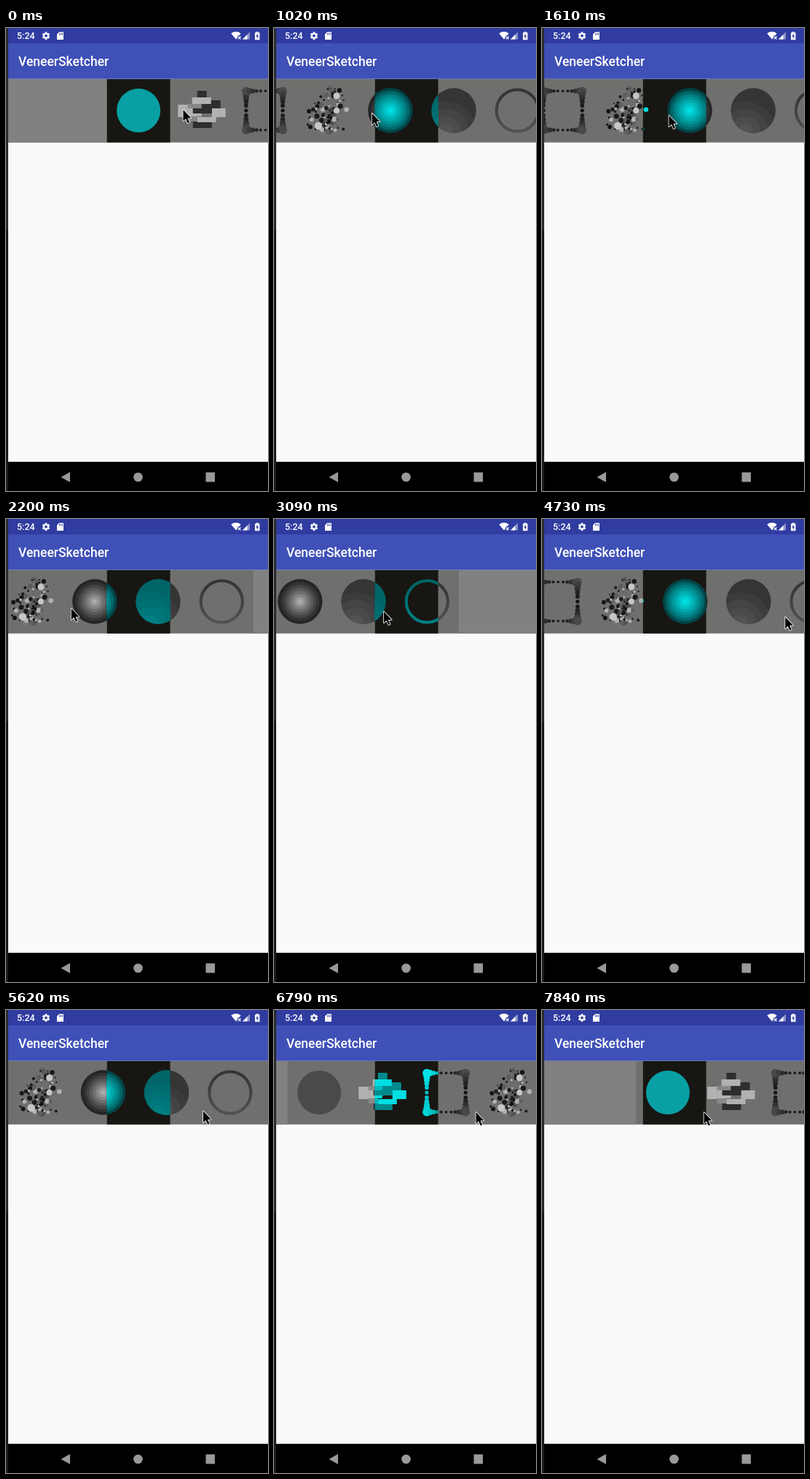
An HTML page with a canvas for the animation above (8000 ms loop, 360x634 px).

```html
<!DOCTYPE html>
<html lang="en">
<head>
<meta charset="utf-8">
<title>Gallery strip</title>
<style>
  html, body { margin: 0; width: 100%; height: 100%; overflow: hidden; background: #fafafa; }
  canvas { position: absolute; left: 0; top: 0; width: 360px; height: 634px; }
  span { position: absolute; color: #fff; font-family: Roboto, sans-serif; font-weight: 500; white-space: nowrap; }
  #clock { left: 15px; top: 3px; font-size: 12.5px; line-height: 16px; }
  #title { left: 17px; top: 34px; font-size: 17.5px; line-height: 24px; }
</style>
</head>
<body>
<canvas id="stage"></canvas>
<span id="clock">5:24</span>
<span id="title">VeneerSketcher</span>
<script>
const W = 360, H = 634, LOOP = 8000, STEP = 148, LAST = 53;
const TOP = 69.75, TILE = 87.25, CX = TILE / 2, MID = 113, LENS = 138.5;
const BAR = '#303ca0', TAU = Math.PI * 2;
const canvas = document.getElementById('stage');
const dpr = window.devicePixelRatio || 1;
canvas.width = W * dpr;
canvas.height = H * dpr;
const c = canvas.getContext('2d');

const clamp = u => Math.min(1, Math.max(0, u));
const mix = (a, b, u) => a + (b - a) * u;
const linear = u => u;
const smooth = u => u * u * (3 - 2 * u);
const fling = u => 1 - (1 - u) ** 1.6;

// Each gesture: last step, strip offset there, easing, sideways bulge on the way.
const gestures = [
  { end: 7, to: -232.8, ease: smooth },
  { end: 15, to: -270.8, ease: u => u ** 3, bulge: 48 },
  { end: 17, to: -385, ease: fling },
  { end: 19, to: -385, ease: linear },
  { end: 26, to: -242.7, ease: smooth },
  { end: 38, to: -259.2, ease: linear, bulge: 55 },
  { end: 46, to: 18.5, ease: smooth },
  { end: 53, to: 129.3, ease: fling }
];
function offset(k) {
  let from = LENS, begin = 0;
  for (const { end, to, ease, bulge = 0 } of gestures) {
    if (k <= end) {
      const u = (k - begin) / (end - begin);
      return mix(from, to, ease(u)) + bulge * Math.sin(Math.PI * u);
    }
    from = to;
    begin = end;
  }
  return from;
}

// The pointer holds the strip while dragging and travels freely between drags.
function pointer(k) {
  const y = mix(112, 140, clamp(k / 40));
  const x = k < 7 ? mix(243, 134, k / 7)
    : k < 16 ? offset(k) + mix(367, 360, (k - 7) / 8)
    : k < 19 ? 50
    : k < 22 ? mix(50, offset(22) + 529.7, (k - 19) / 3)
    : k < 39 ? offset(k) + 529.7
    : k < 46 ? mix(270, 277, (k - 38) / 8) + 55 * Math.sin(Math.PI * (k - 38) / 8)
    : mix(277, 222, (k - 46) / 7);
  return [x, y];
}

function rect(x, y, w, h, fill) {
  c.fillStyle = fill;
  c.fillRect(x, y, w, h);
}
function disc(x, y, r, fill) {
  c.fillStyle = fill;
  c.beginPath();
  c.arc(x, y, r, 0, TAU);
  c.fill();
}
// Outline from "x,y x,y" text.
function poly(pts, fill) {
  c.fillStyle = fill;
  c.beginPath();
  pts.split(' ').forEach(p => c.lineTo(...p.split(',').map(Number)));
  c.closePath();
  c.fill();
}
// v: 0 dark to 1 bright
function tone(v, lit) {
  const g = Math.round(lit ? mix(90, 228, v) : mix(20, 185, v));
  return lit ? `rgb(0,${g},${g + 3})` : `rgb(${g},${g},${g})`;
}
function shade(lit) {
  const g = c.createLinearGradient(0, MID - 20, 0, MID + 31);
  g.addColorStop(0, tone(lit ? .08 : .2, lit));
  g.addColorStop(1, tone(lit ? .3 : .38, lit));
  return g;
}

function seeded(seed) {
  return () => (seed = seed * 16807 % 2147483647) / 2147483647;
}

function emblem(lit) {
  disc(CX, MID, 30, lit ? '#08a0a4' : '#4a4a4a');
}

// Overlapping slabs, widest in the middle, light on the left and dark on the right.
function boxes(lit) {
  const light = tone(.96, lit), mid = tone(.7, lit), dark = tone(lit ? .35 : .16, lit);
  rect(37, 86, 13, 10, dark);
  rect(24, 104, 20, 14, mid);
  rect(43, 99, 26, 18, dark);
  rect(30, 95, 26, 9, light);
  rect(10.5, 105, 13.5, 17, light);
  rect(24, 110, 19, 11, light);
  rect(57, 110, 19, 12, light);
  rect(24, 121, 13, 7, mid);
  rect(31, 128, 26, 9, dark);
  rect(37, 122, 26, 7, light);
  rect(31, 110, 26, 7, dark);
}

// A square of beads: large at the corners, small halfway along each side.
function beads(lit) {
  const half = 26.7, n = 10;
  for (let side = 0; side < 4; side++) {
    for (let i = 0; i <= n; i++) {
      const a = 2 * i / n - 1, s = Math.sign(a) * Math.abs(a) ** .85 * half;
      const edge = side < 2 ? -half : half, flat = side % 2;
      const x = flat ? s : edge, y = flat ? edge : s;
      const r = flat ? 1.8 + 3.8 * Math.abs(a) ** 2 : 2.6 + 3 * Math.abs(a) ** 1.5;
      const glow = lit ? .65 - x / half * .35 - y / half * .1 - .25 * (1 - Math.abs(a))
        : .32 * Math.abs(a) ** 1.3;
      disc(CX + x, MID + y, r, tone(clamp(glow), lit));
    }
  }
}

const rnd = seeded(23);
const bubbles = Array.from({ length: 110 }, (_, i) => {
  const q = rnd(), big = i % 11 === 0;
  const reach = mix(12, 33, Math.sin(q * 2.5)), mid = mix(50, 40, q);
  const r = big ? 4 + 3 * rnd() : 1 + 2.6 * rnd() ** 1.5;
  const v = big ? .35 + .3 * rnd() : [0, 0, .04, .45, .95][Math.floor(rnd() * 5)];
  return { x: mid + (rnd() + rnd() - 1) * reach, y: mix(83, 143, q), r, v, big };
}).sort((a, b) => b.big - a.big);
function cluster(lit) {
  bubbles.forEach(b => disc(b.x, b.y, b.r, tone(b.v, lit)));
  // the few brightest ones
  for (const [x, y, r] of [[32, 134, 5.2], [57, 93, 4.5], [57, 113, 4]]) {
    disc(x, y, r, tone(1.08, lit));
  }
}

function target(lit) {
  const n = 8;
  for (let i = 0; i < n; i++) {
    const u = i / (n - 1);
    const fill = lit ? tone(mix(-.15, 1, u ** .8), lit) : tone(mix(.1, .95, u ** 1.15), lit);
    disc(CX, MID, mix(30.7, 2.5, u), fill);
  }
}

function dish(lit) {
  c.save();
  c.beginPath();
  c.arc(CX, MID, 30.7, 0, TAU);
  c.clip();
  for (let i = 0; i < 5; i++) {
    disc(CX - 11, MID + 29, i ? 52 - 10.3 * i : 90, tone((lit ? .08 : .2) + i * .045, lit));
  }
  c.restore();
}

function ring(lit) {
  c.strokeStyle = shade(lit);
  c.lineWidth = 4;
  c.beginPath();
  c.arc(CX, MID, 28.6, 0, TAU);
  c.stroke();
}

const tiles = [emblem, boxes, beads, cluster, target, dish, ring];

function row(left, lit) {
  tiles.forEach((draw, i) => {
    const x = left + i * TILE;
    if (x > W || x + TILE < 0) return;
    c.save();
    c.translate(x, 0);
    draw(lit);
    c.restore();
  });
}

function strip(left) {
  const end = left + tiles.length * TILE;
  c.save();
  c.beginPath();
  c.rect(3, TOP, W - 3, 87);
  c.clip();
  rect(0, TOP, W, TILE, '#6f6f6d');
  rect(0, TOP, Math.max(0, left), TILE, '#818181');
  if (end < W - 14) rect(end, TOP, W, TILE, '#818181');
  row(left, false);
  c.beginPath();
  c.rect(LENS, TOP, TILE, TILE);
  c.clip();
  rect(LENS, TOP, TILE, TILE, '#171612');
  row(left, true);
  c.restore();
}

function gear(x, y) {
  for (let i = 0; i < 3; i++) {
    c.save();
    c.translate(x, y);
    c.rotate(i * Math.PI / 3);
    rect(-1.4, -5.3, 2.8, 10.6, '#fff');
    c.restore();
  }
  disc(x, y, 4, '#fff');
  disc(x, y, 1.9, BAR);
}

function statusIcons() {
  gear(55, 10.7);

  poly('73,5.5 79,5.5 79,16 70,16 70,8.5', '#fff');
  for (let x = 73; x < 78; x += 2) rect(x, 7, 1, 2.5, BAR);

  c.fillStyle = '#fff';
  c.beginPath();
  c.moveTo(316, 15.5);
  c.arc(316, 15.5, 10.5, -Math.PI * .72, -Math.PI * .28);
  c.fill();
  rect(318, 10.5, 6, 6, BAR);
  c.save();
  c.translate(320.7, 13.4);
  c.rotate(Math.PI / 4);
  rect(-2.7, -.6, 5.4, 1.2, '#fff');
  rect(-.6, -2.7, 1.2, 5.4, '#fff');
  c.restore();

  poly('335,5.5 335,15.5 325,15.5', '#8f96cc');
  poly('331.5,9 331.5,15.5 325,15.5', '#fff');

  rect(342, 6.2, 6.5, 10, '#fff');
  rect(344, 5, 2.5, 1.5, '#fff');
  poly('345.8,7.5 343.2,11.8 345,11.8 344.7,15 347.3,10.7 345.6,10.7', BAR);
}

function chrome() {
  rect(0, 0, W, H, '#fafafa');
  rect(0, 0, W, 21, BAR);
  rect(0, 21, W, TOP - 21, '#3f50b7');
  rect(0, 594, W, H - 594, '#000');
  rect(0, 0, 3, 277, '#2b2b2b');
  rect(0, 277, 3, H - 277, '#1c1c1e');
  statusIcons();
  poly('75.5,615 88,608 88,622', '#999');
  disc(181.5, 615, 6.3, '#999');
  rect(274.5, 608.5, 12.5, 13, '#999');
}

function arrow(x, y) {
  const shape = '0,0 0,15.5 3.5,12.3 6.2,18.2 8.6,17.2 6,11.4 10.8,11.2';
  c.save();
  c.translate(x + .5, y);
  c.strokeStyle = '#fff';
  c.lineWidth = 1.6;
  c.lineJoin = 'round';
  poly(shape, '#000');
  c.stroke();
  poly(shape, '#000');
  c.restore();
}

function frame(time) {
  const k = Math.min(LAST, Math.floor((time % LOOP + 22) / STEP));
  c.setTransform(dpr, 0, 0, dpr, 0, 0);
  chrome();
  strip(offset(k));
  arrow(...pointer(k));
}

const start = performance.now();
function tick(now) {
  frame(Math.max(0, now - start));
  requestAnimationFrame(tick);
}
frame(0);
requestAnimationFrame(tick);
</script>
</body>
</html>
```
